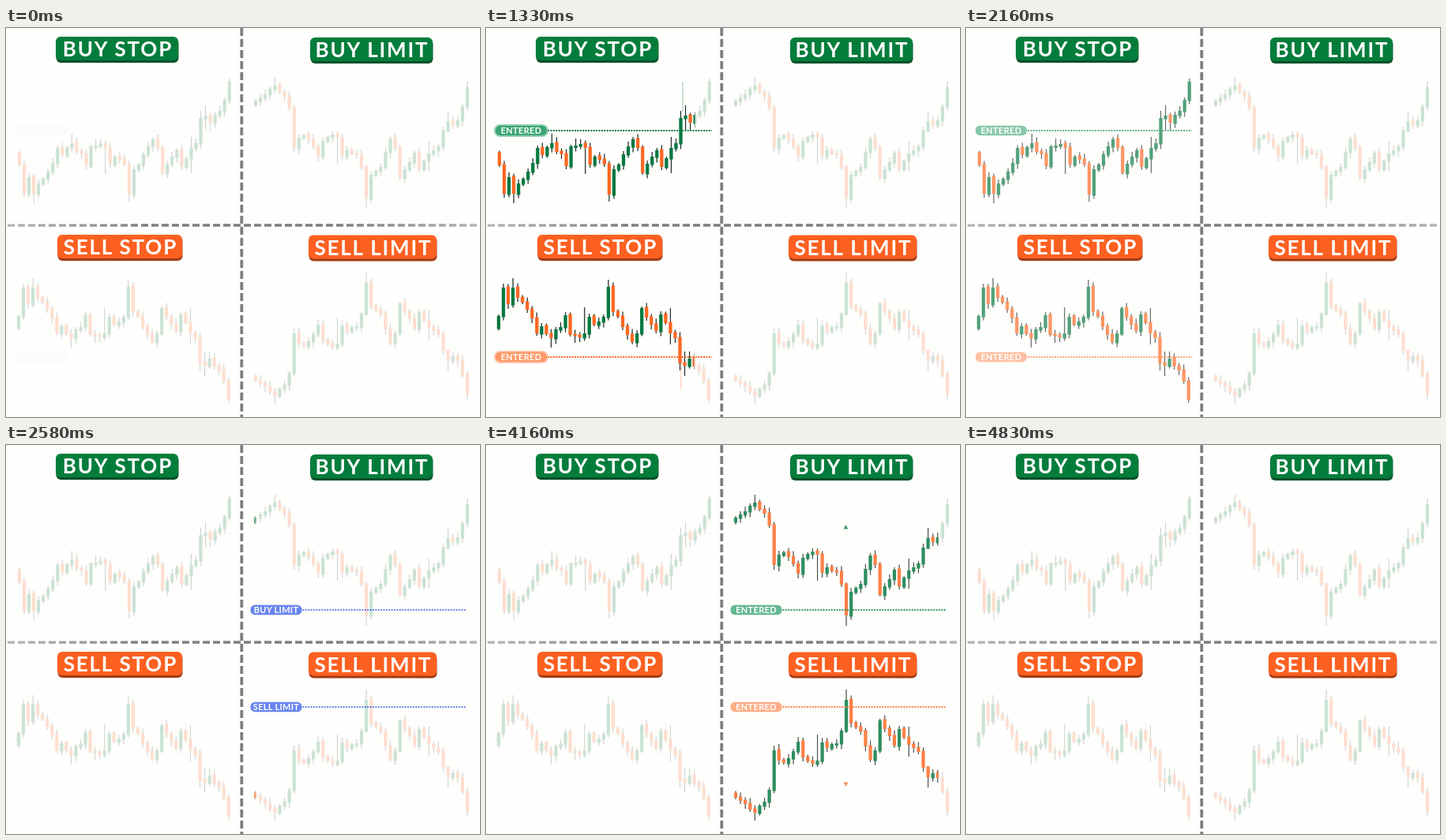
Write an HTML page that moves like this. It is 600 px wide and 493 px high and loops after 4.87 s.

```html
<!DOCTYPE html>
<html lang="en">
<head>
<meta charset="utf-8">
<title>Pending order types</title>
<style>
html, body { margin: 0; width: 100%; height: 100%; overflow: hidden; background: #fefefc; }
svg { display: block; width: 600px; height: 493px; }
text { font-family: Lato, "Open Sans", sans-serif; font-weight: 700; fill: #fff; text-anchor: middle; }
.title { font-size: 26px; letter-spacing: 1.8px; }
.tag { font-size: 11px; letter-spacing: .3px; }
</style>
</head>
<body>
<svg id="stage" viewBox="0 0 600 493">
  <defs>
    <linearGradient id="fade" gradientUnits="userSpaceOnUse" x1="0" y1="0" x2="600" y2="0">
      <stop offset="0" stop-color="#b4b6b6"/>
      <stop offset=".3" stop-color="#7c8081"/>
      <stop offset=".7" stop-color="#7c8081"/>
      <stop offset="1" stop-color="#b4b6b6"/>
    </linearGradient>
  </defs>
</svg>
<script>
const LOOP = 4870, MIRROR = 539, TRAVEL = 68;
const GREEN = '#04783f', ORANGE = '#ff6722', BLUE = '#0836e6', WICK = '#17231f';
const svg = document.getElementById('stage');

function add(parent, name, attrs, label) {
  const el = document.createElementNS('http://www.w3.org/2000/svg', name);
  for (const k in attrs) el.setAttribute(k, attrs[k]);
  if (label) el.textContent = label;
  parent.appendChild(el);
  return el;
}
const clamp = v => Math.max(0, Math.min(1, v));
const ramp = (t, a, b) => clamp((t - a) / (b - a));

// Closing heights; every candle opens at the previous close.
const stopSeries = {
  x: 17, step: 6.04, open: 159,
  close: [174, 210, 189, 210, 197, 191, 182, 171, 152, 161, 151, 146, 157, 160, 175,
    150, 149, 147, 152, 173, 163, 167, 173, 211, 179, 173, 160, 150, 141, 152,
    184, 172, 163, 155, 176, 165, 152, 146, 114, 111, 120, 110, 105, 91, 68],
  high: { 11: 134, 16: 140, 36: 138, 38: 105, 39: 98, 44: 64 },
  low: { 3: 222, 18: 185, 23: 220, 36: 184, 39: 129, 40: 129 }
};
const limitSeries = {
  x: 316, step: 6.09, open: 97,
  close: [92, 88, 84, 77, 73, 82, 87, 102, 152, 139, 136, 142, 151, 163, 143,
    138, 135, 139, 162, 155, 160, 161, 177, 216, 186, 181, 176, 157, 140, 152,
    190, 179, 170, 158, 179, 168, 159, 155, 150, 130, 118, 123, 117, 99, 75],
  high: { 4: 63, 17: 131, 23: 174, 36: 144, 40: 105, 44: 68 },
  low: { 9: 160, 17: 172, 23: 229, 36: 182, 40: 132 }
};

// Times in ms: tag appears, candles start, entry, all shown, fading.
const stopTimes = { show: [0, 100], start: 40, entry: 1110, end: 1570, fade: [1990, 2420] };
const limitTimes = { show: [2520, 2620], start: 2560, entry: 3700, end: 4220, fade: [4040, 4600] };

const charts = [
  { name: 'BUY STOP', series: stopSeries, times: stopTimes, dx: 0, sell: false, entryAt: 38,
    title: [63, 11, 155], tag: [12, 130], lineEnd: 286, arrow: [249, 105] },
  { name: 'SELL STOP', series: stopSeries, times: stopTimes, dx: -1, sell: true, entryAt: 38,
    title: [65, 262, 158], tag: [12, 417], lineEnd: 286, arrow: [247, 421] },
  { name: 'BUY LIMIT', series: limitSeries, times: limitTimes, dx: 0, sell: false, entryAt: 23,
    title: [385, 12, 155], tag: [309.5, 209], lineEnd: 582, arrow: [455.5, 172] },
  { name: 'SELL LIMIT', series: limitSeries, times: limitTimes, dx: 0, sell: true, entryAt: 23,
    title: [383, 262.5, 162], tag: [309.5, 332], lineEnd: 582, arrow: [455.5, 362] }
];

function drawCandles(parent, { series, dx, sell }) {
  let open = series.open;
  series.close.forEach((close, i) => {
    const x = series.x + dx + i * series.step;
    const down = close > open;
    const from = open + (down ? -1.5 : 1.5);
    const top = Math.min(from, close), bottom = Math.max(from, close);
    const high = series.high[i] ?? top - 2 - (i * 7) % 5;
    const low = series.low[i] ?? bottom + 2 + (i * 3) % 5;
    const flip = y => sell ? MIRROR - y : y;
    add(parent, 'line', { x1: x, x2: x, y1: flip(high), y2: flip(low), stroke: WICK, 'stroke-width': 1.1 });
    add(parent, 'rect', {
      x: x - 2.1, y: sell ? MIRROR - bottom : top, width: 4.2, height: Math.max(3, bottom - top),
      fill: down !== sell ? ORANGE : GREEN
    });
    open = close;
  });
}

function drawTag(parent, [x, y], label, fill, lineColor, lineEnd) {
  const g = add(parent, 'g', {});
  add(g, 'line', {
    x1: x + 66, x2: lineEnd, y1: y, y2: y, stroke: lineColor,
    'stroke-width': 1.8, 'stroke-dasharray': '2 1.4'
  });
  add(g, 'rect', { x, y: y - 6.2, width: 65, height: 12.4, rx: 5.5, fill });
  add(g, 'text', { x: x + 32.5, y: y + 4, class: 'tag' }, label);
  return g;
}

function drawTitle({ name, title: [x, y, w], sell }) {
  add(svg, 'rect', { x: x + .5, y: y + 2, width: w, height: 31, rx: 6, fill: sell ? '#a33c14' : '#07502a' });
  add(svg, 'rect', { x, y, width: w, height: 30, rx: 6, fill: sell ? '#fc6020' : '#047d3c' });
  add(svg, 'text', { x: x + w / 2 + .9, y: y + 25.2, class: 'title' }, name);
}

function build(chart, i) {
  const { series, sell, dx, tag, lineEnd, entryAt } = chart;
  const color = sell ? ORANGE : GREEN, soft = sell ? '#ff9867' : '#3ba675';
  drawCandles(add(svg, 'g', { opacity: .2 }), chart);

  const live = add(svg, 'g', {});
  const clip = add(svg.querySelector('defs'), 'clipPath', { id: 'reveal' + i });
  const left = series.x + dx - 3;
  const mask = add(clip, 'rect', { x: left, y: 0, width: 0, height: 493 });
  drawCandles(add(live, 'g', { 'clip-path': `url(#reveal${i})` }), chart);

  const pending = drawTag(live, tag, chart.name, BLUE, BLUE, lineEnd);
  const entered = drawTag(live, tag, 'ENTERED', soft, color, lineEnd);
  const halo = add(live, 'rect', {
    x: tag[0] - 1, y: tag[1] - 7, width: 67, height: 14, rx: 6.5,
    fill: 'none', stroke: soft, 'stroke-width': 2
  });
  const trail = add(live, 'line', { stroke: color, 'stroke-width': 1, 'stroke-dasharray': '1 1.5' });
  const head = add(live, 'path', { d: 'M0 -3L2.8 2.5H-2.8Z', fill: color });
  const toEntry = entryAt * series.step;
  const toEnd = (series.close.length - 1) * series.step + 7;
  drawTitle(chart);

  return t => {
    const { show, start, entry, end, fade } = chart.times;
    const since = t - entry;
    live.setAttribute('opacity', ramp(t, ...show) * (1 - ramp(t, ...fade)));
    mask.setAttribute('width', toEntry * ramp(t, start, entry) + (toEnd - toEntry) * ramp(t, entry, end));

    const swap = ramp(since, 0, 150);
    pending.setAttribute('opacity', 1 - swap);
    entered.setAttribute('opacity', swap);
    halo.setAttribute('opacity', .5 * ramp(since, 50, 200) * (1 - ramp(since, 220, 400)));

    const [x, y] = chart.arrow, dir = sell ? 1 : -1;
    const tip = y + dir * TRAVEL * ramp(since, 0, 400);
    const tail = y + dir * TRAVEL * ramp(since, 230, 440);
    for (const [k, v] of Object.entries({ x1: x, x2: x, y1: tail, y2: tip })) trail.setAttribute(k, v);
    const size = ramp(since, 280, 400) * (1 - ramp(since, 480, 700));
    head.setAttribute('transform', `translate(${x} ${tip}) scale(${size} ${-dir * size})`);
  };
}

add(svg, 'line', { x1: 298.3, x2: 298.3, y1: 0, y2: 493, stroke: '#7c8081', 'stroke-width': 3.8, 'stroke-dasharray': '10 4' });
add(svg, 'path', { d: 'M2 250.1L600 250', stroke: 'url(#fade)', 'stroke-width': 3.4, 'stroke-dasharray': '9 4' });

const updates = charts.map(build);
function frame() {
  const t = performance.now() % LOOP;
  updates.forEach(update => update(t));
  requestAnimationFrame(frame);
}
frame();
</script>
</body>
</html>
```
